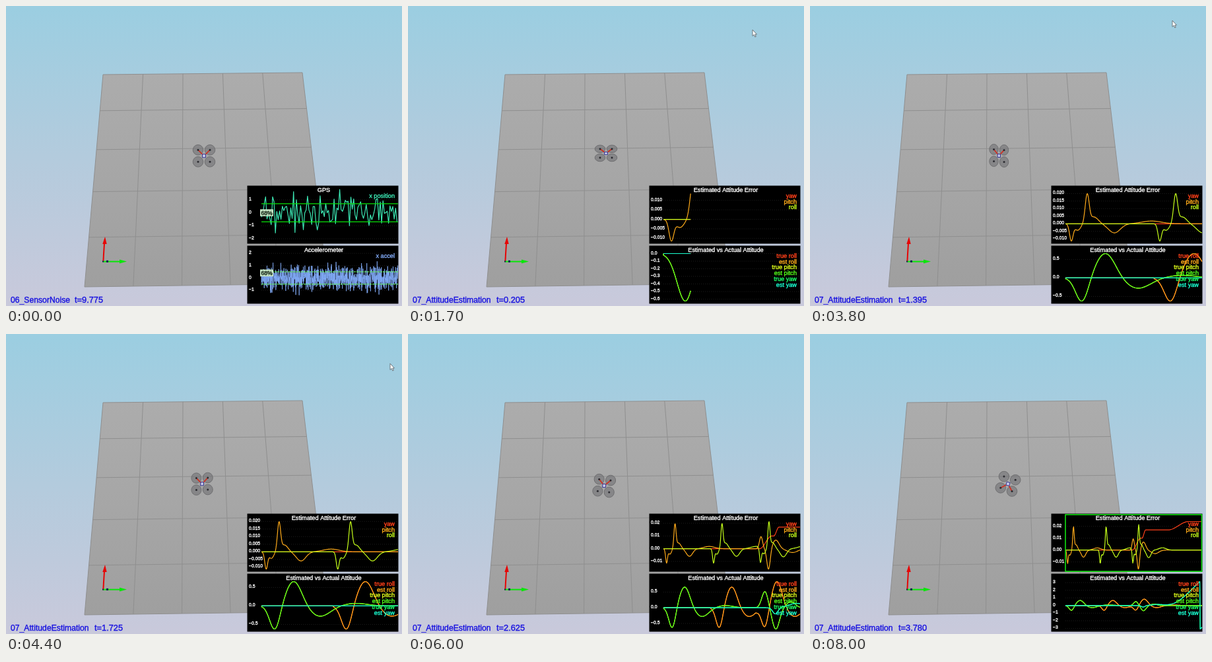
These frames come from a looping animation (600x455 px, 8100 ms). An HTML page with a canvas:

```html
<!DOCTYPE html>
<html lang="en">
<head>
<meta charset="utf-8">
<title>Quadrotor sensor simulation</title>
<style>
html, body { margin: 0; width: 100%; height: 100%; overflow: hidden; }
canvas { display: block; }
</style>
</head>
<body>
<canvas id="stage" width="600" height="455"></canvas>
<script>
const ctx = document.getElementById('stage').getContext('2d');
const LOOP = 8100, STEP = 100, SWITCH = 1400, SELECT = 6800;
const FONT = '"Liberation Sans", Arial, sans-serif';
const LEFT = 387, RIGHT = 594, SPAN = RIGHT - LEFT;
const hue = h => `hsl(${h},100%,55%)`;

const bump = (t, mid, width, height) => height * Math.exp(-.5 * ((t - mid) / width) ** 2);
const rise = (t, from, to) => {
  const u = Math.min(1, Math.max(0, (t - from) / (to - from)));
  return u * u * (3 - 2 * u);
};

// Straight moves between key points [x, value].
function glide(x, ...keys) {
  let i = 0;
  while (i < keys.length - 2 && x > keys[i + 1][0]) i++;
  const [x0, a] = keys[i], [x1, b] = keys[i + 1];
  return a + (b - a) * (x - x0) / (x1 - x0);
}

const simTime = ms => glide(ms, [1338, 0], [3800, 1.395], [5000, 2.055], [6000, 2.625], [8000, 3.78]);

// Response to one manoeuvre: attitude, estimation error and drift.
const swing = s => s <= 0 ? 0 :
  bump(s, .17, .065, -.66) + bump(s, .41, .1, .67) + bump(s, .74, .13, -.28) + bump(s, 1.19, .15, .07);
const lag = s => s <= 0 ? 0 :
  bump(s, .06, .018, -.011) + bump(s, .125, .03, -.0043) + bump(s, .222, .02, .0185)
  + bump(s, .29, .045, .0045) + bump(s, .5, .06, -.006) + bump(s, .88, .1, .0018);
const drift = s => s <= 0 ? 0 : bump(s, .49, .18, -13.7) + bump(s, 1.1, .15, -2);

const roll = t => swing(t - .905) + swing(t - 1.78) + bump(t, 2.17, .07, .12);
const pitch = t => swing(t) + bump(t, 1.95, .06, .52) + bump(t, 2.16, .07, -.68) + bump(t, 2.45, .08, .2);
const yaw = t => {
  const spin = .564 * Math.log(1 + Math.exp((t - 3.05) / .12));
  const a = spin + bump(t, 2.15, .05, -.2) + bump(t, 2.55, .15, .13);
  return a > Math.PI ? a - 2 * Math.PI : a;
};
const rollError = t => lag(t - .903) + 1.07 * lag(t - 1.805);
const pitchError = t => lag(t) + bump(t, 1.875, .03, .0095) + bump(t, 2.02, .033, -.0165)
  + bump(t, 2.16, .06, .0068) + bump(t, 2.48, .1, -.003);
const yawError = t => .01 * rise(t, 1.85, 2.08) + .007 * rise(t, 2.12, 2.22) + .007 * rise(t, 2.85, 3.4);

function noise(i) {
  let s = 0;
  for (let k = 1; k < 5; k++) {
    const v = Math.sin(i * 12.9898 + k * 78.233) * 43758.5453;
    s += v - Math.floor(v);
  }
  return (s - 2) * 1.73;
}

function text(s, x, y, size, color, align = 'left') {
  ctx.font = `${size}px ${FONT}`;
  ctx.fillStyle = ctx.strokeStyle = color;
  ctx.lineWidth = .4;
  ctx.textAlign = align;
  ctx.fillText(s, x, y);
  ctx.strokeText(s, x, y);
}

function line(x1, y1, x2, y2, color, width = 1) {
  ctx.strokeStyle = color;
  ctx.lineWidth = width;
  ctx.beginPath();
  ctx.moveTo(x1, y1);
  ctx.lineTo(x2, y2);
  ctx.stroke();
}

function shape(points, fill, stroke) {
  ctx.beginPath();
  points.forEach(([x, y]) => ctx.lineTo(x, y));
  ctx.closePath();
  ctx.fillStyle = fill;
  ctx.fill();
  if (stroke) { ctx.strokeStyle = stroke; ctx.lineWidth = 1; ctx.stroke(); }
}

// Perspective map of the unit square onto the floor.
const floorPoint = (() => {
  const [[x0, y0], [x1, y1], [x2, y2], [x3, y3]] = [[147, 104], [449, 101], [487, 421], [119, 426]];
  const dx1 = x1 - x2, dx2 = x3 - x2, dy1 = y1 - y2, dy2 = y3 - y2;
  const sx = x0 - x1 + x2 - x3, sy = y0 - y1 + y2 - y3, d = dx1 * dy2 - dx2 * dy1;
  const g = (sx * dy2 - dx2 * sy) / d, h = (dx1 * sy - sx * dy1) / d;
  return (u, v) => {
    const w = g * u + h * v + 1;
    return [((x1 - x0 + g * x1) * u + (x3 - x0 + h * x3) * v + x0) / w,
      ((y1 - y0 + g * y1) * u + (y3 - y0 + h * y3) * v + y0) / w];
  };
})();

function gradient(y1, y2, ...colors) {
  const g = ctx.createLinearGradient(0, y1, 0, y2);
  colors.forEach((c, i) => g.addColorStop(i / (colors.length - 1), c));
  return g;
}

function drawScene() {
  ctx.fillStyle = gradient(0, 455, '#9bcee1', '#b3cbdd', '#c9c9db');
  ctx.fillRect(0, 0, 600, 455);
  shape([floorPoint(0, 0), floorPoint(1, 0), floorPoint(1, 1), floorPoint(0, 1)],
    gradient(101, 426, '#acacac', '#a6a6a6', '#9f9f9f'), '#8f8f8f');
  for (let i = 1; i < 5; i++) {
    line(...floorPoint(i / 5, 0), ...floorPoint(i / 5, 1), '#8f8f8f');
    line(...floorPoint(0, i / 5), ...floorPoint(1, i / 5), '#8f8f8f');
  }
  line(147.3, 388, 149, 360, '#e60505', 2);
  shape([[146.3, 361], [150, 350], [152.7, 361]], '#e60505');
  line(147, 387.6, 173, 387.6, '#08e608', 2);
  shape([[172, 384.6], [183, 387.6], [172, 390.6]], '#08e608');
  ctx.fillStyle = '#101c50';
  ctx.fillRect(146, 386.5, 2, 2);
  ctx.fillRect(152, 385.8, 3, 3);
}

function disc(x, y, rx, ry, fill, stroke) {
  ctx.beginPath();
  ctx.ellipse(x, y, rx, ry, 0, 0, 2 * Math.PI);
  ctx.fillStyle = fill;
  ctx.fill();
  if (stroke) { ctx.strokeStyle = stroke; ctx.lineWidth = 1; ctx.stroke(); }
}

function drawDrone(t) {
  const x0 = 300 + drift(t - .905) + drift(t - 1.8);
  const y0 = 227.3 + drift(t) - drift(t - 1.8);
  const a = yaw(t), c = Math.cos(a), s = Math.sin(a), r = roll(t);
  const kx = Math.cos(1.2 * r), ky = Math.cos(pitch(t) - .3) / Math.cos(.3), skew = .15 * Math.sin(r);
  const place = (x, y) => {
    const px = (x * c - y * s) * kx;
    return [x0 + px, y0 + (x * s + y * c) * ky + px * skew];
  };
  const corners = size => [[-1, -1], [1, -1], [1, 1], [-1, 1]].map(([x, y]) => place(x * size, y * size));
  const props = corners(9);
  props.forEach(([x, y]) => disc(x, y, 7.8 * kx, 7.8 * ky, 'rgba(108,108,111,.55)', '#6f6f71'));
  props.forEach(([x, y], i) => {
    const front = i < 2;
    line(x0, y0, x, y, front ? '#d62a1c' : '#83838b', front ? 1.6 : .8);
    disc(x, y, 1.5, 1.5, '#2b2b30');
  });
  shape(corners(2.5), '#c4c4e6', '#33338c');
}

function tick(label, y) {
  ctx.setLineDash([1, 2]);
  line(LEFT, y, RIGHT, y, '#2a2a2a', .7);
  ctx.setLineDash([]);
  text(label.replace('-', '\u2212'), 368, y + 1, 6.8, '#f4f4f4');
}

function panel(y, title, draw) {
  ctx.save();
  ctx.beginPath();
  ctx.rect(365.5, y - .5, 229, 88);
  ctx.clip();
  ctx.fillStyle = '#000';
  ctx.fillRect(365, y - 1, 230, 89);
  draw();
  text(title, 481.5, y + 8.8, 9.2, '#fff', 'center');
  ctx.restore();
}

function trace(n, xy, color, width) {
  ctx.strokeStyle = color;
  ctx.lineWidth = width;
  ctx.lineJoin = 'round';
  ctx.beginPath();
  for (let i = 0; i <= n; i++) ctx.lineTo(...xy(i));
  ctx.stroke();
}

function legend(series, y) {
  series.forEach((s, k) => text(s.name, 589, y + 17.6 + k * 8.9, 9.2, s.color, 'right'));
}

function noisePlot(y, t, o) {
  panel(y, o.title, () => {
    const py = v => o.zero - v * o.scale;
    for (let v = o.top; v > o.top - 4; v--) tick(String(v), py(v));
    trace(Math.floor(t / o.dt), i => [LEFT + SPAN * i * o.dt / t, py(o.sigma * noise(i + o.seed))], o.color, o.width);
    ctx.setLineDash(o.dash);
    for (const v of [-o.band, o.band]) line(LEFT, py(v), RIGHT, py(v), o.bandColor, 1.2);
    ctx.setLineDash([]);
    const box = py(o.band) + 8.5 - o.inset;
    ctx.fillStyle = '#c4e4c4';
    ctx.fillRect(385, box, 20, 10.5);
    text('68%', 395, box + 8.4, 8.6, '#102010', 'center');
    legend([o], y);
  });
}

function fitPlot(y, title, t, series) {
  panel(y, title, () => {
    const n = 300, rows = series.map(s => Array.from({ length: n + 1 }, (_, i) => s.f(t * i / n)));
    const all = rows.flat(), lo = Math.min(...all), hi = Math.max(...all, lo + 1e-4);
    const py = v => y + 11.5 + 72 * (hi - v) / (hi - lo);
    let step = 1e-5, five = true;
    while ((hi - lo) / step >= 7) { step *= five ? 5 : 2; five = !five; }
    const digits = Math.max(0, -Math.floor(Math.log10(step) + 1e-6));
    for (let k = Math.ceil(lo / step); k * step <= hi + step * .05; k++) {
      tick((k * step).toFixed(digits), py(k * step));
    }
    const width = SPAN * Math.min(1, t / 1.03);
    rows.forEach((row, k) => trace(n, i => [LEFT + width * i / n, py(row[i])], series[k].color, 1.2));
    legend(series, y);
  });
}

const errors = [
  { name: 'yaw', color: hue(10), f: yawError },
  { name: 'pitch', color: hue(38), f: pitchError },
  { name: 'roll', color: hue(75), f: rollError }
];
const attitudes = [
  { name: 'true roll', color: hue(10), f: roll },
  { name: 'est roll', color: hue(38), f: roll },
  { name: 'true pitch', color: hue(68), f: pitch },
  { name: 'est pitch', color: hue(105), f: pitch },
  { name: 'true yaw', color: hue(140), f: yaw },
  { name: 'est yaw', color: hue(168), f: yaw }
];
const gps = {
  title: 'GPS', name: 'x position', color: '#3ce8b4', width: 1.2, dt: .1, sigma: .72, seed: 3,
  zero: 313.6, scale: 19.7, top: 1, band: .7, bandColor: '#08e008', dash: [], inset: 0
};
const accel = {
  title: 'Accelerometer', name: 'x accel', color: '#82abf8', width: .8, dt: .01, sigma: .5, seed: 500,
  zero: 412.5, scale: 18.7, top: 2, band: .5, bandColor: '#62f062', dash: [3, 1], inset: 12
};

const mouseX = ms => glide(ms, [1300, 527], [1700, 522], [3800, 549], [4800, 604]);
const mouseY = ms => glide(ms, [1300, 33], [1700, 36], [3800, 22], [4800, 60]);

function drawMouse(ms) {
  if (ms < 1300 || ms > 4800) return;
  const x = mouseX(ms), y = mouseY(ms);
  shape([[0, 0], [0, 9.5], [2.2, 7.5], [3.8, 11], [5.3, 10.3], [3.8, 7], [6.5, 7]]
    .map(([a, b]) => [x + a, y + b]), '#fff', '#6a747a');
}

function render(ms) {
  const first = ms < SWITCH;
  const t = Math.round((first ? 9.775 + ms * .000567 : simTime(ms)) * 200) / 200;
  drawScene();
  drawDrone(first ? 0 : t);
  if (first) {
    noisePlot(273, t, gps);
    noisePlot(364, t, accel);
  } else {
    fitPlot(273, 'Estimated Attitude Error', t, errors);
    fitPlot(364, 'Estimated vs Actual Attitude', t, attitudes);
    if (ms >= SELECT) {
      ctx.strokeStyle = '#10e010';
      ctx.lineWidth = 1.6;
      ctx.strokeRect(387, 274, 206.5, 86);
    }
  }
  text(first ? '06_SensorNoise' : '07_AttitudeEstimation', 7, 449.5, 12.2, '#1c16e0');
  text('t=' + t.toFixed(3), first ? 104 : 134, 449.5, 12.8, '#1c16e0');
  drawMouse(ms);
}

const start = performance.now();
function loop() {
  const ms = (performance.now() - start) % LOOP;
  render(Math.floor(ms / STEP) * STEP);
  requestAnimationFrame(loop);
}
loop();
</script>
</body>
</html>
```
